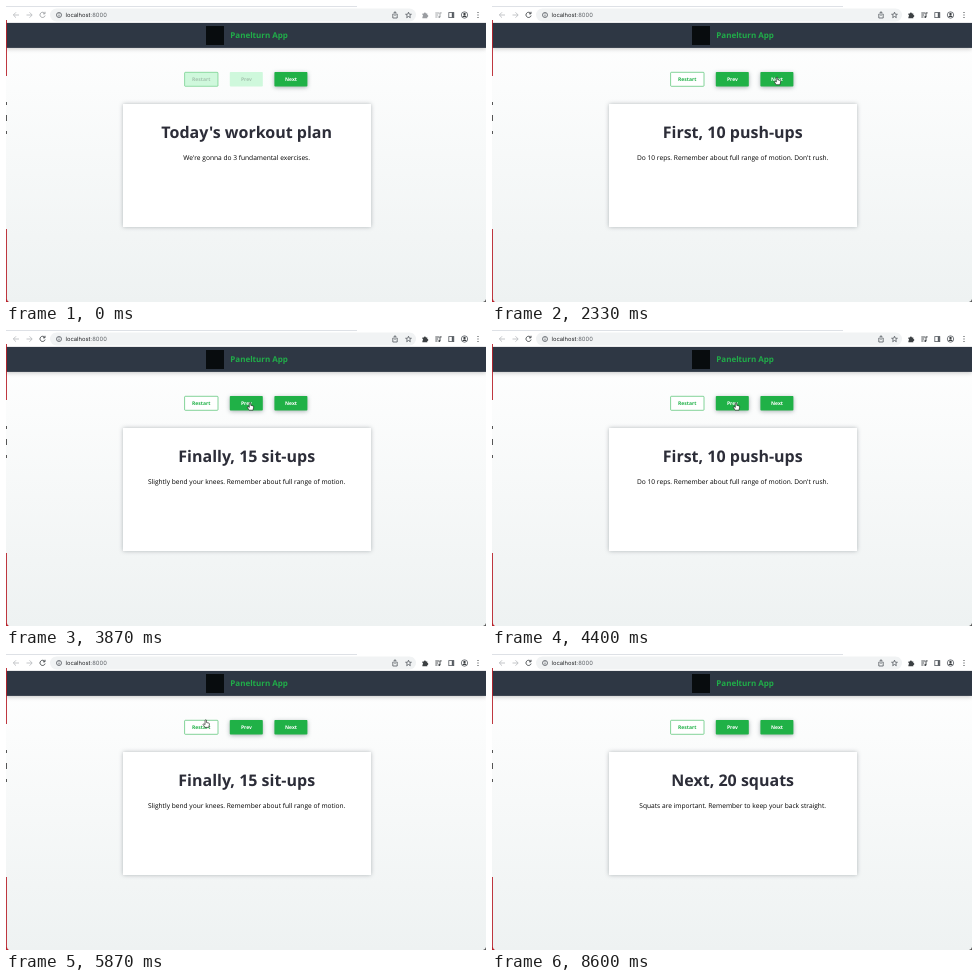
An HTML page that plays this animation: 480 by 296 pixels, repeating every 9470 ms.

```html
<!DOCTYPE html>
<html lang="en">
<head>
<meta charset="utf-8">
<title>Slides</title>
<style>
html, body { margin: 0; width: 100%; height: 100%; overflow: hidden; background: #fff; }
svg { display: block; width: 100%; height: 100%; font-family: "Open Sans", sans-serif; text-rendering: geometricPrecision; }
.mid { text-anchor: middle; }
.btn text { font-size: 5px; font-weight: 700; fill: #fff; text-anchor: middle; }
.btn rect { fill: #20b147; filter: drop-shadow(0 1.5px 2px rgba(20, 40, 50, .35)); }
#restart rect { fill: #fff; stroke: #20b147; stroke-width: .55; filter: none; }
#restart text { fill: #20b147; }
.btn.off rect, #restart.off rect { fill: #cff8dc; stroke-opacity: .8; filter: none; }
.btn.off text, #restart.off text { fill: #a3c4ae; }
.line { fill: none; stroke: #555a60; stroke-width: .8; }
#focus { fill: none; stroke: #3c4043; stroke-width: .9; }
#focus.idle { stroke: #9a9da1; }
#focus .solid { fill: #3c4043; stroke: none; }
#focus.idle .solid { fill: #9a9da1; }
</style>
</head>
<body>
<svg viewBox="0 0 480 296">
  <defs>
    <linearGradient id="page" x2="0" y2="1">
      <stop stop-color="#fff"/><stop offset="1" stop-color="#eef2f2"/>
    </linearGradient>
  </defs>

  <rect y="17" width="480" height="279" fill="url(#page)"/>
  <rect y="16.7" width="480" height="25.2" fill="#2e3744" style="filter:drop-shadow(0 1px 2px rgba(0,0,0,.22))"/>
  <rect x="200" y="20" width="18" height="19" fill="#080c0e"/>
  <text x="224.3" y="32.2" font-size="8" font-weight="700" fill="#20ad49">Panelturn App</text>

  <!-- browser toolbar -->
  <rect width="480" height="16.7" fill="#fff"/>
  <rect width="351" height="1" fill="#dee1e6"/>
  <rect x="44" y="2.5" width="366" height="13" rx="6.5" fill="#f1f3f4"/>
  <path class="line" style="stroke:#b5b8bc" d="M13 9H7.5M10 6.3L7.3 9L10 11.7M20.5 9H26M23.5 6.3L26.2 9L23.5 11.7"/>
  <g class="line">
    <circle cx="53" cy="9" r="2.5"/><path d="M53 8.6V10.5M53 7.2V7.9"/>
    <path d="M387.8 8H386.8V12H391.2V8H390.2M389 10V5.8M387.7 7L389 5.7L390.3 7"/>
    <path d="M402.5 6.2L403.3 8.2L405.4 8.3L403.8 9.6L404.3 11.7L402.5 10.5L400.7 11.7L401.2 9.6L399.6 8.3L401.7 8.2Z"/>
    <rect x="442.8" y="6.6" width="5" height="5"/><path stroke-width="2" d="M446.8 6.5V11.6"/>
    <circle cx="458.5" cy="9" r="3.2"/>
  </g>
  <path fill="#3c4043" d="M456.3 11a2.3 2 0 0 1 4.4 0zM457.3 8a1.2 1.2 0 1 1 2.4 0a1.2 1.2 0 1 1-2.4 0M471.5 6h1v1h-1zM471.5 8.5h1v1h-1zM471.5 11h1v1h-1z"/>
  <g id="focus">
    <path d="M38.6 7.2A2.6 2.6 0 1 0 39.1 9.6M39 5.8V7.8H37"/>
    <path class="solid" d="M416.4 7.4h1.5a1 1 0 0 1 2 0h1.4v1.5a1 1 0 0 1 0 2v1.3h-4.9v-1.4a1 1 0 0 0 0-1.9z"/>
    <path d="M429.3 7H433.5M429.3 9H432.2M429.3 11H431.5M434 11V6.9H435.7"/>
    <circle class="solid" cx="433.3" cy="11" r="1"/>
  </g>
  <text x="59.5" y="11.2" font-size="5.85" fill="#202124" style="font-family:Inter,sans-serif">localhost<tspan fill="#5f6368">:8000</tspan></text>

  <!-- window behind the edges -->
  <path fill="#b8232c" d="M0 14H.9V70H0ZM0 223H.9V293Q1 295 3 296H0Z"/>
  <path fill="#555" d="M0 96H1V99H0ZM0 109H1V115H0ZM0 125H1V128H0ZM480 293V296H477Q479.5 295.5 480 293Z"/>

  <g id="restart" class="btn"><rect x="178.6" y="66.3" width="33.4" height="14" rx=".8"/><text x="195.2" y="75.1">Restart</text></g>
  <g id="prev" class="btn"><rect x="223.8" y="66" width="33" height="14.6" rx=".8"/><text x="240.4" y="75.1">Prev</text></g>
  <g id="next" class="btn"><rect x="268.4" y="66" width="33" height="14.6" rx=".8"/><text x="285" y="75.1">Next</text></g>

  <rect x="117" y="98" width="248" height="123" fill="#fff" style="filter:drop-shadow(0 .7px 2px rgba(20,30,40,.3))"/>
  <text id="title" class="mid" x="240.7" y="131.7" font-size="16" font-weight="700" fill="#2c2d38"></text>
  <text id="body" class="mid" x="240.7" y="153.8" font-size="6.64" fill="#000"></text>

  <g id="cursor" stroke-width=".6" stroke-linejoin="round">
    <path id="arrow" stroke="#fff" d="M0 0V6.8L1.5 5.4L2.6 7.8L3.7 7.3L2.6 5H4.7Z"/>
    <path id="hand" fill="#fff" stroke="#111" d="M-.7 0Q0-.7.7 0V2.3L3 2.9Q3.8 3.2 3.7 4L3 7.2H-.9L-2.7 4.2Q-2.4 3.4-1.6 3.8L-.7 4.5Z"/>
  </g>
</svg>
<script>
const LOOP = 9470, TICK = 1000 / 15;
const FOCUS = 1470, SHOW = 330, HIDE = 8590;
const slides = [
  ["Today's workout plan", "We're gonna do 3 fundamental exercises."],
  ["First, 10 push-ups", "Do 10 reps. Remember about full range of motion. Don't rush."],
  ["Next, 20 squats", "Squats are important. Remember to keep your back straight."],
  ["Finally, 15 sit-ups", "Slightly bend your knees. Remember about full range of motion."]
];
// runs of clicks on one button
const runs = [
  { start: 1860, gap: 500, step: 1, count: 3 },
  { start: 4000, gap: 265, step: -1, count: 3 },
  { start: 5200, gap: 200, step: 1, count: 3 },
  { start: 6270, gap: 1, step: -3, count: 1 },
  { start: 7270, gap: 260, step: 1, count: 2 }
];
// pointer trips between resting places
const enter = [423, 236], page = [308, 110], exit = [409, 54];
const restart = [197, 66], prev = [244, 73], next = [285, 71.5];
const trips = [
  { start: SHOW, time: 470, to: page },
  { start: 1070, time: 200, to: next },
  { start: 3470, time: 330, to: prev },
  { start: 4800, time: 310, to: next },
  { start: 5670, time: 220, to: restart },
  { start: 6870, time: 165, to: next },
  { start: 8410, time: 130, to: exit }
];
const $ = id => document.getElementById(id);
const show = (id, on) => $(id).style.display = on ? "" : "none";
const clamp = (v, max) => Math.max(0, Math.min(max, v));
const ease = k => k * k * (3 - 2 * k);

const slideAt = t => runs.reduce((n, r) =>
  n + r.step * clamp(Math.floor((t - r.start) / r.gap) + 1, r.count), 0);

const pointerAt = t => trips.reduce((p, { start, time, to }) => {
  const k = ease(clamp((t - start) / time, 1));
  return p.map((v, i) => v + (to[i] - v) * k);
}, enter);

function draw(t) {
  const slide = slideAt(t);
  [$("title").textContent, $("body").textContent] = slides[slide];
  for (const id of ["restart", "prev"]) $(id).classList.toggle("off", slide === 0);
  $("focus").classList.toggle("idle", t < FOCUS);

  // a hand while resting on or reaching a button, an arrow on the way
  const moving = trips.some(m => t >= m.start && t < m.start + m.time * .8);
  const hand = t >= FOCUS && (!moving || t >= HIDE);
  show("cursor", t >= SHOW && t < HIDE);
  show("hand", hand);
  show("arrow", !hand);
  $("cursor").setAttribute("transform", `translate(${pointerAt(t)})`);
}

function frame() {
  const t = performance.now() % LOOP;
  draw(Math.floor((t + 5) / TICK) * TICK);
  requestAnimationFrame(frame);
}
frame();
</script>
</body>
</html>
```
